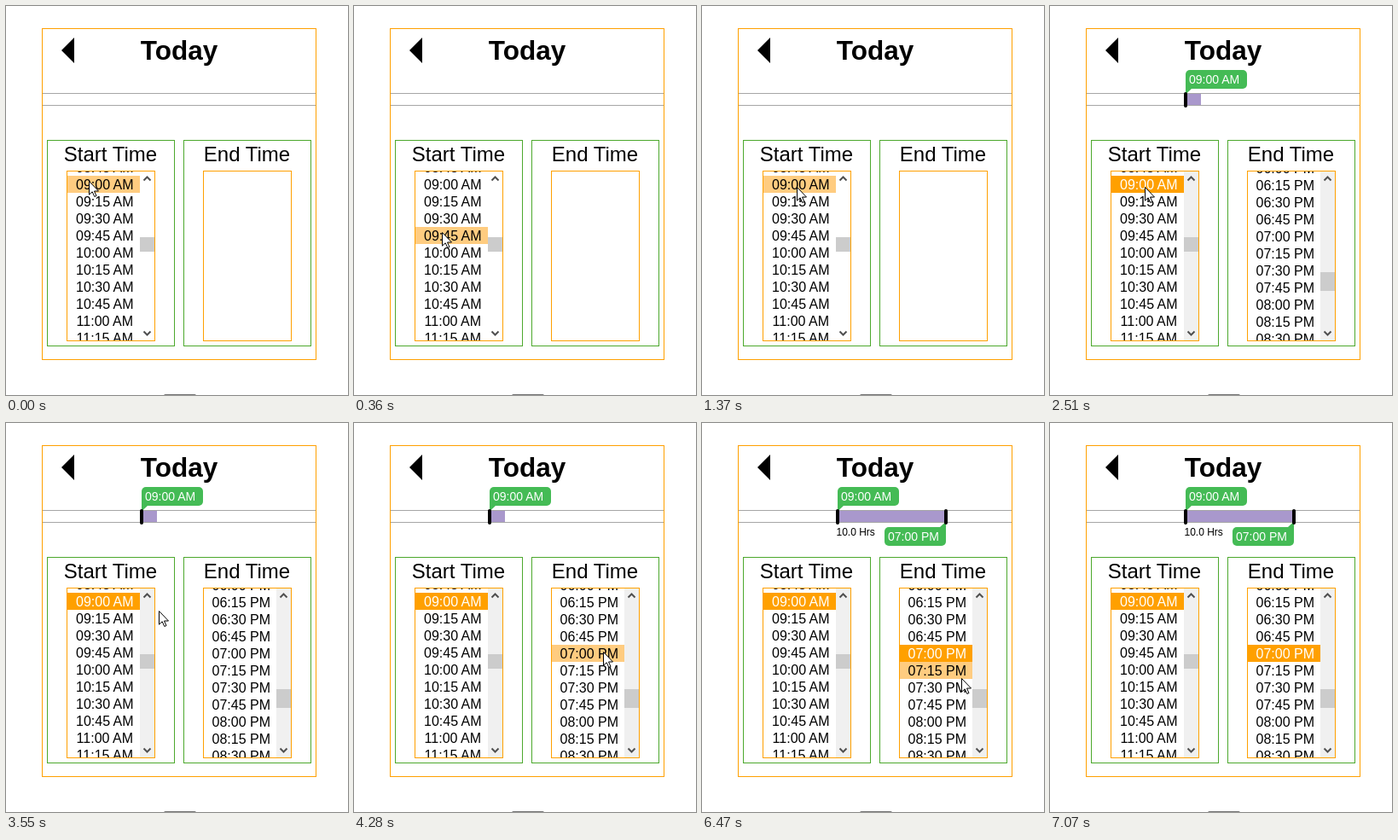
An HTML page for the animation above (7750 ms loop, 401 px wide and 456 px high).

```html
<!DOCTYPE html>
<html lang="en">
<head>
<meta charset="utf-8">
<title>Time range picker</title>
<style>
  html, body { margin: 0; width: 100%; height: 100%; overflow: hidden; background: #fff; }
  svg { display: block; font-family: "Liberation Sans", Arial, sans-serif; }
  .line { fill: none; stroke: #ffa000; }
  .green { fill: none; stroke: #4ca82c; }
  .mid { text-anchor: middle; }
  .tip { fill: #44bb55; }
  .tipText { fill: #fff; font-size: 14px; }
</style>
</head>
<body>
<svg width="401" height="456">
  <defs>
    <clipPath id="view"><rect x="72" y="194" width="102" height="198"/></clipPath>
  </defs>
  <path d="M43 102.5H363M43 116.5H363" stroke="#a6a6a6"/>
  <rect class="line" x="42.5" y="26.5" width="321" height="388"/>
  <path d="M65 52L80 37V67Z"/>
  <text class="mid" x="203" y="63" font-size="31.5" font-weight="bold">Today</text>
  <rect x="185" y="455" width="38" height="6" rx="2" fill="#777"/>

  <rect id="bar" x="159" y="103" height="13" fill="#a998cc"/>
  <g id="startMark">
    <rect class="tip" x="159" y="75" width="72" height="22" rx="5"/>
    <path class="tip" d="M159 90V103.5L166 97V90Z"/>
    <text class="tipText" x="163" y="91">09:00 AM</text>
    <rect x="157" y="101" width="4" height="18" rx="2"/>
  </g>
  <g id="endMark">
    <rect class="tip" x="214" y="122" width="72" height="22" rx="5"/>
    <path class="tip" d="M286 129V115.5L279 122V129Z"/>
    <text class="tipText" x="218" y="138">07:00 PM</text>
    <rect x="284" y="101" width="4" height="18" rx="2"/>
    <text x="157.5" y="131.5" font-size="12">10.0 Hrs</text>
  </g>

  <g id="lists"></g>
  <path id="cursor" d="M.5 .5V16.2L4.2 12.8L6.8 18.5L9 17.5L6.5 12H11.5Z" fill="#fff" stroke="#000"/>
</svg>
<script>
const LOOP = 7750, PICK_START = 2510, PICK_END = 5460, ROW = 20;
const $ = id => document.getElementById(id);

// Pointer strokes: the pointer jumps in `steps` updates between `from` and `to`
// and eases out to (x, y) with the given power.
const home = { x: 97, y: 205 };
const strokes = [
  { from: 60, to: 660, steps: 11, x: 107, y: 297, power: 1.33 },
  { from: 840, to: 1080, steps: 5, x: 114, y: 220, power: 1.93 },
  { from: 1260, to: 1370, steps: 3, x: 111, y: 212, power: 1 },
  { from: 3250, to: 3446, steps: 4, x: 160, y: 213, power: 1 },
  { from: 3512, to: 3970, steps: 8, x: 314, y: 268, power: 1 },
  { from: 4030, to: 4280, steps: 5, x: 292, y: 268, power: 1 },
  { from: 6370, to: 7070, steps: 13, x: 372, y: 470, power: 1 }
];

// Pointer place at time t, held back by a part of a step
function pointer(t, lag = 0) {
  let p = home;
  for (const s of strokes) {
    if (t < s.from) break;
    const step = Math.floor((t - s.from) / (s.to - s.from) * (s.steps - 1) + 1e-6);
    const k = (Math.min(step + 1, s.steps) - lag) / s.steps;
    const e = 1 - (1 - k) ** s.power;
    const next = { x: p.x + (s.x - p.x) * e, y: p.y + (s.y - p.y) * e };
    if (t < s.to) return next;
    p = lag && s === strokes.findLast(o => t >= o.from) ? next : s;
  }
  return p;
}

function add(parent, tag, attrs, text = "") {
  const el = document.createElementNS("http://www.w3.org/2000/svg", tag);
  for (const k in attrs) el.setAttribute(k, attrs[k]);
  el.textContent = text;
  return parent.appendChild(el);
}

function clock(min) {
  const pad = n => String(n).padStart(2, "0");
  return `${pad((Math.floor(min / 60) + 11) % 12 + 1)}:${pad(min % 60)} ${min < 720 ? "AM" : "PM"}`;
}

function makeList(title, x, top, firstMinute, thumbY, thumbH) {
  const g = add($("lists"), "g", { transform: `translate(${x})` });
  add(g, "rect", { class: "green", x: 48.5, y: 157.5, width: 149, height: 241 });
  add(g, "text", { class: "mid", x: 122.5, y: 182, "font-size": 24 }, title);
  const body = add(g, "g", { "clip-path": "url(#view)" });
  const rows = Array.from({ length: 11 }, (_, i) => {
    const y = top + i * ROW;
    return {
      back: add(body, "rect", { x: 72, y, width: 85, height: ROW }),
      text: add(body, "text", { class: "mid", x: 115.8, y: y + 16, "font-size": 16 },
                clock(firstMinute + i * 15))
    };
  });
  const track = add(body, "rect", { x: 157, y: 194, width: 17, height: 198, fill: "#f0f0f0" });
  add(body, "rect", { x: 157, y: thumbY, width: 17, height: thumbH, fill: "#ccc" });
  add(body, "path", { d: "M161.5 204.5l4-4l4 4M161.5 381.5l4 4l4-4",
                      fill: "none", stroke: "#505050", "stroke-width": 2 });
  add(g, "rect", { class: "line", x: 71.5, y: 193.5, width: 103, height: 199 });
  return { x, top, rows, body, track };
}

const startList = makeList("Start Time", 0, 179, 8 * 60 + 45, 271, 17);
const endList = makeList("End Time", 160, 180, 18 * 60, 312, 22);

function paint(list, p, selected) {
  const x = p.x - list.x;
  const inside = x >= 72 && x < 157 && p.y >= 194 && p.y < 392;
  const hover = inside ? Math.floor((p.y - list.top) / ROW) : -1;
  list.rows.forEach(({ back, text }, i) => {
    back.setAttribute("fill", i === selected ? "#ffa000" : i === hover ? "#ffcc80" : "none");
    text.setAttribute("fill", i === selected ? "#fff" : "#000");
  });
}

const show = (el, on) => el.style.display = on ? "" : "none";

function draw(t) {
  const begun = t >= PICK_START, done = t >= PICK_END;
  const { x, y } = pointer(t), late = pointer(t, 0.5); // row highlight trails the pointer
  paint(startList, late, begun ? 1 : -1);
  paint(endList, late, done ? 4 : -1);
  show(startList.track, begun);
  show(endList.body, begun);
  show($("startMark"), begun);
  show($("endMark"), done);
  $("bar").setAttribute("width", done ? 127 : begun ? 18 : 0);
  $("cursor").setAttribute("transform", `translate(${Math.round(x)} ${Math.round(y)})`);
}

function tick() {
  draw(performance.now() % LOOP);
  requestAnimationFrame(tick);
}
tick();
</script>
</body>
</html>
```
